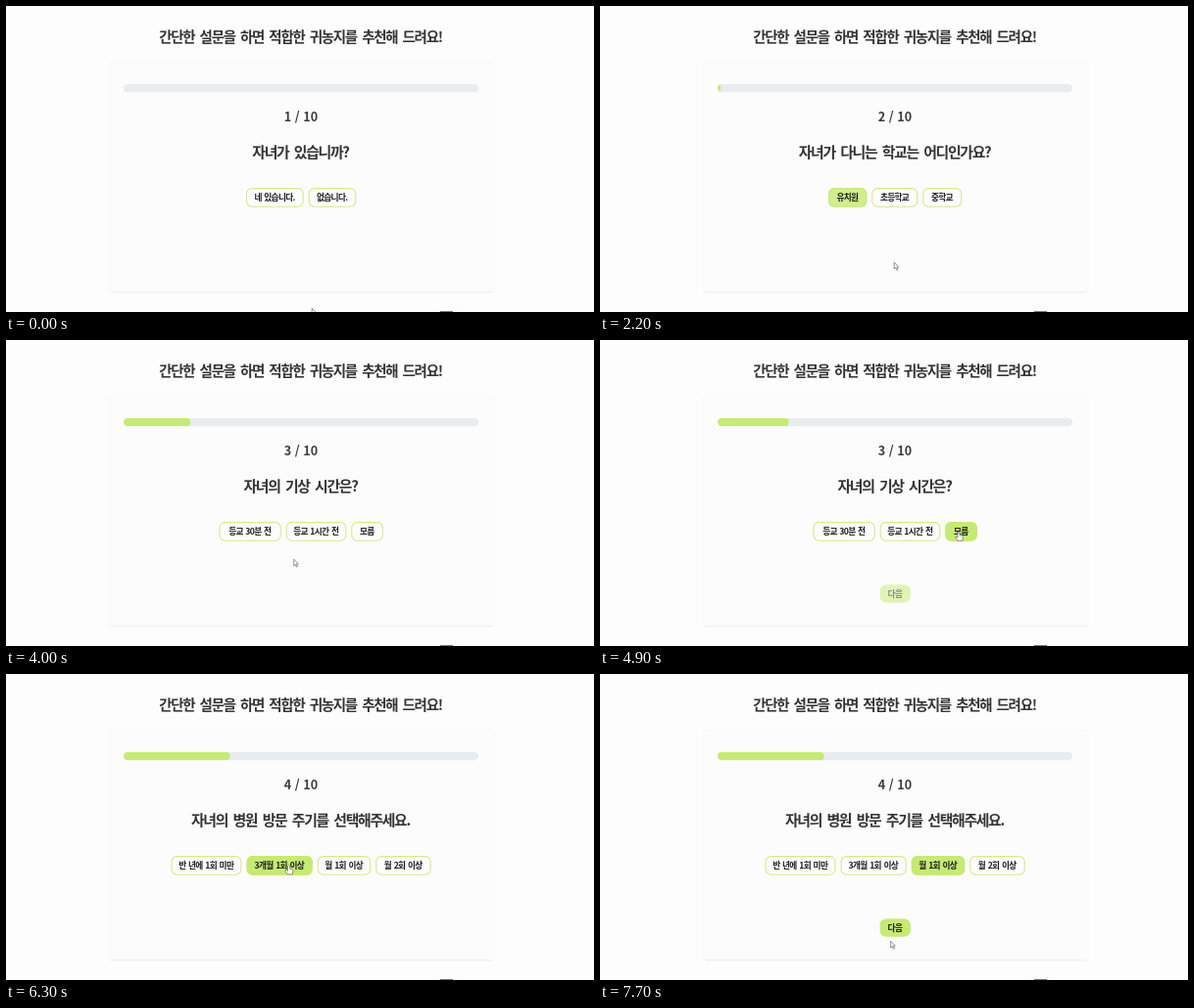
These frames come from a looping animation (600 by 313 pixels, 8000 ms). An HTML page:

```html
<!DOCTYPE html>
<html lang="ko">
<head>
<meta charset="utf-8">
<title>설문</title>
<style>
html, body { margin: 0; width: 100%; height: 100%; overflow: hidden; background: #fdfdfd; }
svg { display: block; width: 100%; height: 100%; }
text { font-family: "Noto Sans CJK KR", "Noto Sans CJK", sans-serif; font-weight: 700; text-anchor: middle; fill: #333; }
.title { font-size: 14.5px; letter-spacing: -.09em; word-spacing: .175em; }
#ask { font-size: 14.9px; }
.count { font-size: 12.6px; fill: #3c3c3c; }
.label { font-size: 8.7px; font-weight: 900; letter-spacing: -.08em; word-spacing: .1em; fill: #1c1c1c; }
</style>
</head>
<body>
<svg viewBox="0 0 600 313">
  <rect width="600" height="313" fill="#fdfdfd"/>
  <rect x="105" y="57" width="393" height="236" rx="4" fill="#fcfcfc" stroke="#fafafa"/>
  <path d="M107 292.8H496" stroke="#ededed"/>
  <text class="title" x="300.5" y="37.4">간단한 설문을 하면 적합한 귀농지를 추천해 드려요!</text>
  <rect x="120" y="79.9" width="362" height="8.3" rx="4.1" fill="#e8ecef"/>
  <clipPath id="track"><rect x="120" y="79.9" width="362" height="8.3" rx="4.1"/></clipPath>
  <g clip-path="url(#track)"><rect id="bar" x="120" y="79.9" height="8.3" rx="4" fill="#c5eb71"/></g>
  <text class="count" id="count" x="301" y="117.5"></text>
  <text class="title" id="ask" x="300.5" y="155.2"></text>
  <g id="buttons"></g>
  <rect x="443" y="312" width="13" height="1" fill="#3d9c83"/>
  <g id="cursor" fill="#fff" stroke="#666" stroke-width=".7" stroke-linejoin="round">
    <path id="arrow" d="M.2 .2V7L1.8 5.6 2.9 8.1 4 7.6 2.9 5.1H4.8Z"/>
    <path id="hand" d="M-1 .8Q0-.6 1 .8V3.8L3.6 4.3Q4.5 4.6 4.4 5.6L3.8 9.4H-1L-3.4 5.9Q-3.2 4.7-2 5.2L-1 6.1Z"/>
  </g>
</svg>
<script>
const LOOP = 8000, STEP = 100, BAR_MS = 420, FADE_MS = 200, GREEN = '#c5eb71';
const $ = id => document.getElementById(id);

// Options: label, left, right
const questions = [
  { start: 0, ask: '자녀가 있습니까?', pick: 0, pickAt: 1300, nextAt: 1300,
    options: [['네 있습니다.', 245, 303.7], ['없습니다.', 308.7, 357.3]] },
  { start: 2160, ask: '자녀가 다니는 학교는 어디인가요?', pick: 0, pickAt: 3000, nextAt: 3020,
    options: [['유치원', 233.2, 272.3], ['초등학교', 277.3, 324.3], ['중학교', 329.3, 369.2]] },
  { start: 3750, ask: '자녀의 기상 시간은?', pick: 2, pickAt: 4800, nextAt: 4800,
    options: [['등교 30분 전', 217.5, 280.7], ['등교 1시간 전', 285.7, 347.3], ['모름', 352.3, 384.8]] },
  { start: 5590, ask: '자녀의 병원 방문 주기를 선택해주세요.', pick: 2, pickAt: 7200, nextAt: 7200,
    options: [['반 년에 1회 미만', 168.6, 240.4], ['3개월 1회 이상', 245.6, 312.7],
              ['월 1회 이상', 317.8, 372.2], ['월 2회 이상', 377.3, 433.7]] }
];

// Pointer tip: time, x, y
const path = [
  [0, 312, 309], [800, 275, 196], [1900, 275, 196], [2000, 300, 262], [2200, 300, 262],
  [2900, 265, 200.5], [3200, 265, 200.5], [3500, 299, 253], [3700, 299, 253],
  [4000, 293.5, 224], [4600, 366, 196], [4900, 366, 196], [5400, 309.5, 261],
  [5600, 309.5, 261], [6200, 288.5, 195.5], [6700, 288.5, 195.5], [7100, 335, 193],
  [7600, 335, 193], [7700, 296.5, 273], [LOOP, 296.5, 273]
];

const clamp = v => Math.max(0, Math.min(1, v));
const smooth = v => v * v * (3 - 2 * v);

// CSS "ease": cubic-bezier(.25, .1, .25, 1)
function ease(x) {
  let lo = 0, hi = 1;
  const curve = (a, b, s) => 3 * a * s * (1 - s) ** 2 + 3 * b * s * s * (1 - s) + s ** 3;
  for (let i = 0; i < 20; i++) {
    const mid = (lo + hi) / 2;
    if (curve(.25, .25, mid) < x) lo = mid; else hi = mid;
  }
  return curve(.1, 1, lo);
}

function pointer(t) {
  const i = Math.max(1, path.findIndex(p => p[0] > t));
  const [t0, x0, y0] = path[i - 1], [t1, x1, y1] = path[i];
  const k = smooth(clamp((t - t0) / (t1 - t0)));
  return [x0 + (x1 - x0) * k, y0 + (y1 - y0) * k];
}

function button(label, left, right, top, height, fill, opacity = 1) {
  const w = right - left;
  const box = `x="${left + .5}" y="${top + .5}" width="${w - 1}" height="${height - 1}" rx="5.5"`;
  return `<g opacity="${opacity}"><rect ${box} fill="#fdfdfd" stroke="#d0ed86" stroke-width="1.1"/>
    <rect ${box} fill="${GREEN}" stroke="${GREEN}" stroke-width="1.1" opacity="${fill}"/>
    <text class="label" x="${left + w / 2 - .3}" y="${top + height / 2 + 3}">${label}</text></g>`;
}

function draw(t) {
  const n = questions.findLastIndex(q => q.start <= t);
  const q = questions[n], before = questions[n - 1];
  const [x, y] = pointer(t);
  const inside = (l, r, top, h) => x >= l && x <= r && y >= top && y <= top + h;
  const age = t - q.start;
  let over = false;

  let html = q.options.map(([label, l, r], i) => {
    const hover = inside(l, r, 186.1, 19.6);
    over = over || hover;
    const on = hover || (i === q.pick && t >= q.pickAt);
    const left = before && i === before.pick ? 1 - clamp(age / FADE_MS) : 0;
    return button(label, l, r, 186.1, 19.6, on ? 1 : left);
  }).join('');
  if (t > q.nextAt) {
    over = over || inside(286, 316, 250.5, 18);
    html += button('다음', 285.8, 316.6, 250.5, 18, 1, clamp((t - q.nextAt) / FADE_MS));
  }

  $('buttons').innerHTML = html;
  $('ask').textContent = q.ask;
  $('count').textContent = `${n + 1} / 10`;
  $('bar').setAttribute('width', n ? 36.2 * (n - 1 + ease(clamp(age / BAR_MS))) : 0);
  $('cursor').setAttribute('transform', `translate(${x} ${y})`);
  $('arrow').style.display = over ? 'none' : '';
  $('hand').style.display = over ? '' : 'none';
}

let begin, shown = -1;
function tick(now) {
  begin ??= now;
  const t = Math.floor((now - begin) % LOOP / STEP) * STEP;
  if (t !== shown) draw(shown = t);
  requestAnimationFrame(tick);
}
draw(0);
requestAnimationFrame(tick);
</script>
</body>
</html>
```
